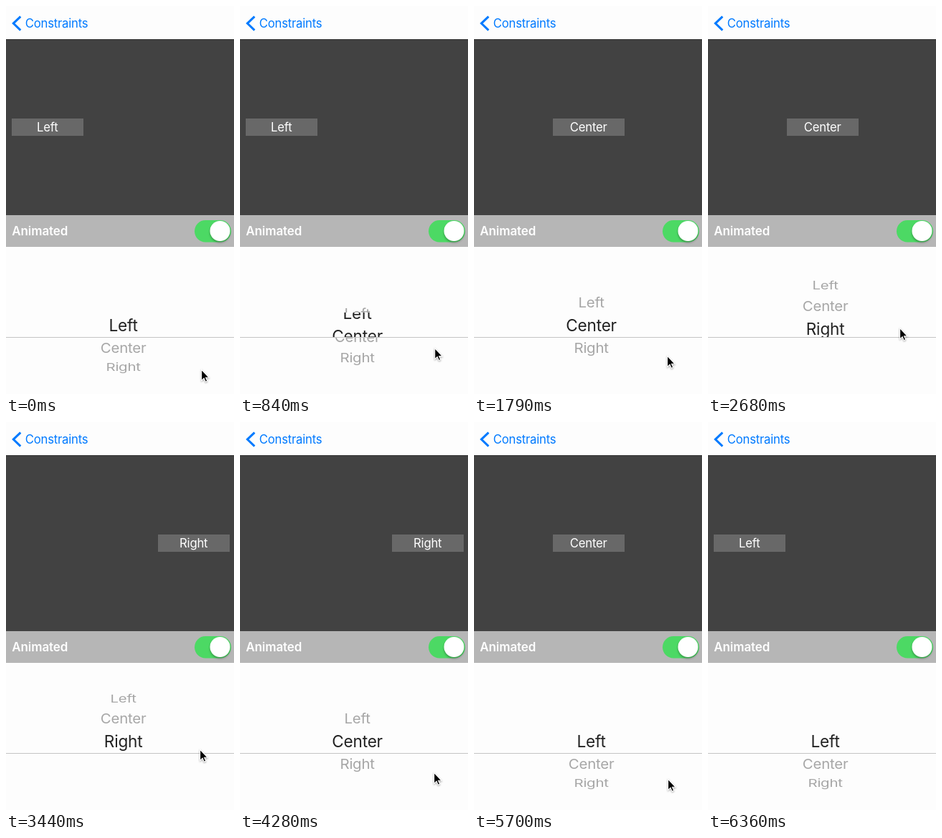
An HTML page that plays this animation: 318x538 px, repeating every 6.72 s.

```html
<!DOCTYPE html>
<html lang="en">
<head>
<meta charset="utf-8">
<title>Constraint picker</title>
<style>
  html, body { margin: 0; width: 100%; height: 100%; overflow: hidden; background: #fdfdfd; }
  svg { display: block; width: 100%; height: 100%; }
  text { font: 400 16.7px Inter, Roboto, sans-serif; letter-spacing: -0.2px; }
  .mid text, text.mid { text-anchor: middle; }
  .dim text { font-size: 20.4px; fill: #a6a6a6; }
  .lit text { font-size: 22.6px; fill: #222; }
  .bold { font-size: 17px; font-weight: 600; letter-spacing: -0.1px; }
  #cursor { filter: drop-shadow(0 1px 0.8px rgba(0, 0, 0, .35)); }
</style>
</head>
<body>
<svg viewBox="0 0 318 538">
  <defs>
    <clipPath id="band"><rect y="425" width="318" height="34"/></clipPath>
    <clipPath id="rest"><path d="M0 334H318V425H0ZM0 460H318V538H0Z"/></clipPath>
    <filter id="soft" x="-30%" y="-30%" width="160%" height="160%">
      <feGaussianBlur stdDeviation="1.6"/>
    </filter>
  </defs>

  <rect width="318" height="538" fill="#fdfdfd"/>
  <path d="M20.3 14.6 10.3 24.1 20.3 33.6" fill="none" stroke="#007aff" stroke-width="3"/>
  <text x="26.7" y="30" fill="#007aff">Constraints</text>

  <rect y="46" width="318" height="244" fill="#424242"/>
  <rect y="46" width="318" height="1" fill="#2f2f2f"/>
  <g id="label">
    <rect y="156" width="100" height="24" fill="#686868"/>
    <text id="name" class="mid" x="49.7" y="174" fill="#fff"></text>
  </g>

  <rect y="290" width="318" height="44" fill="#b6b6b6"/>
  <text class="bold" x="8.3" y="318" fill="#fff">Animated</text>
  <rect x="263" y="297" width="51" height="30.5" rx="15.25" fill="#4cd964"/>
  <circle cx="298.5" cy="314" r="14" fill="#000" opacity=".3" filter="url(#soft)"/>
  <circle cx="298.5" cy="312" r="14" fill="#fff"/>

  <g clip-path="url(#rest)"><g id="dim" class="dim mid"></g></g>
  <g clip-path="url(#band)"><g id="lit" class="lit mid"></g></g>
  <rect y="459" width="318" height="1" fill="#c4c4c4"/>

  <path id="cursor" d="M.6 1.2V16.4L4.1 13.2 6.3 18.2 8.7 17.1 6.6 12.3H11.2Z"
        fill="#000" stroke="#fff" stroke-width="1.1"/>
</svg>
<script>
const LOOP = 6720;
const NAMES = ['Left', 'Center', 'Right'];
const MID = 442.5, RADIUS = 84.9, STEP = 21.8 * Math.PI / 180;

// Each part glides to a new value from the given time on: [start, value...]
const SPIN = 240, SLIDE = 500, REACH = 300;
const spins = [[720, 1], [2501, 2], [3760, 1], [5350, 0]];
const slides = [[1270, 1], [2895, 2], [4475, 1], [5850, 0]];
const reaches = [[600, 271, 470], [1190, 269, 484], [2400, 267, 445], [3140, 270, 453],
  [3440, 270, 460], [3740, 270, 485], [4280, 270, 453], [5300, 270, 494], [5980, 275, 541]];

const $ = id => document.getElementById(id);
const clamp = v => Math.min(1, Math.max(0, v));
const smooth = u => u * u * (3 - 2 * u);
const stopX = row => 8 + 102 * row;

// cubic-bezier(.42, 0, .58, 1)
function easeInOut(x) {
  let lo = 0, hi = 1;
  for (let i = 0; i < 20; i++) {
    const s = (lo + hi) / 2, r = 1 - s;
    if (3 * r * r * s * .42 + 3 * r * s * s * .58 + s ** 3 < x) lo = s; else hi = s;
  }
  return smooth(lo);
}

function glide(from, moves, span, t, ease = smooth, col = 1) {
  return moves.reduce((v, move) => v + (move[col] - v) * ease(clamp((t - move[0]) / span)), from);
}

function addRows(id, baseline) {
  return NAMES.map(name => {
    const row = document.createElementNS('http://www.w3.org/2000/svg', 'text');
    row.textContent = name;
    row.setAttribute('y', baseline);
    $(id).append(row);
    return row;
  });
}

const layers = [addRows('dim', 7.4), addRows('lit', 8.2)];

function place(node, x, y, squash = 1) {
  node.setAttribute('transform', `translate(${x} ${y}) scale(1 ${squash})`);
}

function draw(t) {
  const row = glide(0, spins, SPIN, t);
  for (const rows of layers) {
    rows.forEach((node, i) => {
      const angle = (i - row) * STEP;
      place(node, 163.6, MID + RADIUS * Math.sin(angle), Math.cos(angle));
    });
  }

  place($('label'), Math.round(stopX(glide(0, slides, SLIDE, t, easeInOut))), 0);
  const name = NAMES[glide(0, slides, 1, t, Math.ceil)];
  if ($('name').textContent !== name) $('name').textContent = name;

  place($('cursor'), glide(272, reaches, REACH, t), glide(503, reaches, REACH, t, smooth, 2));
}

const begin = performance.now();
function tick() {
  draw((performance.now() - begin) % LOOP);
  requestAnimationFrame(tick);
}
tick();
</script>
</body>
</html>
```
